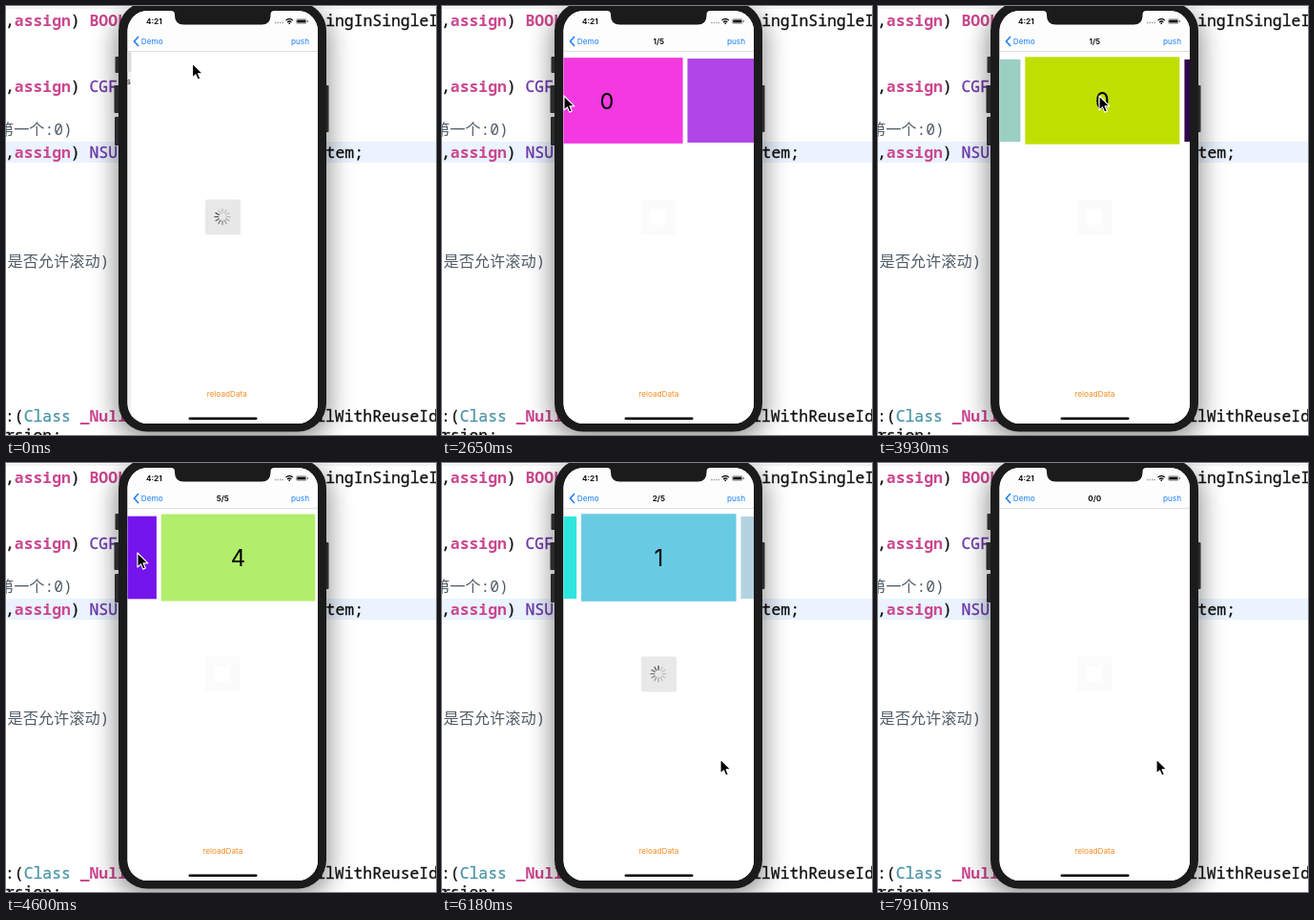
Animation, 451 px wide and 449 px high, one loop 8000 ms. Source, as an HTML page:

```html
<!DOCTYPE html>
<html lang="en">
<head>
<meta charset="utf-8">
<title>Paging carousel demo</title>
<style>
  html, body { margin: 0; width: 100%; height: 100%; overflow: hidden; background: #fff; }
  svg { display: block; width: 451px; height: 449px; }
  text { white-space: pre; }
  .code { font: 500 16.4px "Noto Sans Mono", "DejaVu Sans Mono", monospace; fill: #111; stroke: #111; stroke-width: .3px; }
  .key { font-weight: 600; fill: #cb478f; stroke: none; }
  .type { fill: #6c36a9; stroke: #6c36a9; }
  .class { fill: #4b95a6; stroke: #4b95a6; }
  .note { font: 16.2px "Noto Sans Mono", "Noto Sans CJK SC", "Noto Sans CJK", monospace; fill: #525d68; }
  .ui { font: 8.2px Inter, Roboto, sans-serif; }
  .ui.bold { font-weight: 600; }
  .blue { fill: #147efb; }
  .mid { text-anchor: middle; }
  .digit { font: 24px Inter, Roboto, sans-serif; text-anchor: middle; }
</style>
</head>
<body>
<svg viewBox="0 0 451 449">
  <defs>
    <filter id="blur" x="-40%" y="-20%" width="180%" height="140%">
      <feGaussianBlur stdDeviation="13"/>
    </filter>
    <clipPath id="screen"><rect x="127.5" y="5" width="199.5" height="432" rx="21"/></clipPath>
  </defs>

  <rect width="451" height="449" fill="#fff"/>
  <rect y="1.5" width="451" height="1" fill="#e6e6e6"/>
  <rect y="142" width="451" height="22" fill="#eaf3fe"/>
  <g class="code">
    <text x="-1" y="21">,<tspan class="key">assign</tspan>) <tspan class="key">BOOL</tspan></text>
    <text x="335.2" y="21">ingInSingleItem</text>
    <text x="-1" y="90">,<tspan class="key">assign</tspan>) <tspan class="type">CGFloat</tspan></text>
    <text x="-1" y="159">,<tspan class="key">assign</tspan>) <tspan class="type">NSUInteger</tspan></text>
    <text x="335.6" y="159">tem;</text>
    <text x="-1" y="435">:(<tspan class="class">Class</tspan> <tspan class="key">_Nullable</tspan>)</text>
    <text x="325.2" y="435">llWithReuseId</text>
    <text x="-1" y="455">rsion;</text>
  </g>
  <g class="note">
    <text x="-8" y="135">第一个:0)</text>
    <text x="1.5" y="273">是否允许滚动)</text>
  </g>

  <rect x="115" y="4" width="224" height="450" rx="32" opacity=".44" filter="url(#blur)"/>
  <g fill="#2b2b2d">
    <rect x="114.5" y="53" width="6" height="17" rx="1"/>
    <rect x="113.5" y="83" width="6" height="29" rx="1"/>
    <rect x="114" y="116" width="6" height="30" rx="1"/>
    <rect x="333" y="83" width="5.5" height="49" rx="1"/>
  </g>
  <rect x="118" y="-4" width="218" height="449.6" rx="30" fill="#1b1b1c"/>

  <g clip-path="url(#screen)">
    <rect x="127" y="5" width="200" height="432" fill="#fff"/>
    <g id="behind">
      <rect x="127" y="48" width="8" height="389" fill="#f1f1f1"/>
      <rect x="127" y="48" width="8" height="21" fill="#dcdcdc"/>
      <text class="ui" x="126.5" y="82">s</text>
    </g>
    <g id="page">
      <rect x="127" y="48" width="205" height="389" fill="#fff"/>
      <g id="cards"></g>
      <text class="ui mid" x="227.3" y="409.3" fill="#f58a1f">reloadData</text>
    </g>
    <rect x="127" y="5" width="200" height="42.5" fill="#fdfdfd"/>
    <rect x="127" y="47" width="200" height=".8" fill="#d9d9db"/>
    <path d="M139 32l-4.600 5 4.600 5" fill="none" stroke="#147efb" stroke-width="1.5"/>
    <text class="ui blue" x="141.800" y="39.800">Demo</text>
    <text class="ui blue" x="299" y="39.800">push</text>
    <text class="ui mid bold" id="title" x="227.300" y="39.800"></text>

    <text class="ui bold" x="147" y="18.800">4:21</text>
    <path d="M282 17.500h9" stroke="#a5a5a5" stroke-width="1.300" stroke-dasharray="1.500 1"/>
    <g fill="none" stroke="#111">
      <path d="M293.500 15q3.700-3 7.400 0M295 16.900q2.200-1.800 4.400 0" stroke-width="1.300"/>
      <path d="M296.400 18.300h1.600" stroke-width="1.400"/>
      <rect x="304.400" y="13.600" width="10.800" height="4.800" rx="1.300" stroke-width=".6" stroke="#777"/>
    </g>
    <rect x="305.200" y="14.400" width="9.200" height="3.200" rx=".7" fill="#111"/>
    <rect x="315.900" y="15" width="1" height="2" fill="#777"/>

    <rect x="191.500" y="430.500" width="72" height="2.600" rx="1.300"/>
    <g id="hud">
      <rect x="209" y="202.500" width="37" height="37" rx="2" fill="#e8e8e8"/>
      <g id="spinner" stroke="#4c4c4c" stroke-width="1.300" stroke-linecap="round"></g>
      <rect id="hole" x="218" y="213" width="16" height="16" fill="#fff"/>
    </g>
  </g>
  <path d="M173 4v1q4 0 4 4v1q0 9.500 9.500 9.500h81.500q9.500 0 9.500-9.500v-1q0-4 4-4v-1z" fill="#1b1b1c"/>

  <path id="cursor" d="M0 0v14.300l3.300-3 2.200 5 2.500-1.100-2.200-4.900h4.600z" stroke="#fff" stroke-width="1.100" stroke-linejoin="round"/>
</svg>

<script>
const LOOP = 8000, PITCH = 162.5, CENTER = 227.3;
const LOADED = 1570, EMPTY = 7770;
const SETTLE = 440, REACH = 120;
const NS = "http://www.w3.org/2000/svg";
const $ = id => document.getElementById(id);

const clamp = v => Math.min(Math.max(v, 0), 1);
const ramp = (t, from, to) => clamp((t - from) / (to - from));
const smooth = p => p * p * (3 - 2 * p);
const easeOut = p => 1 - (1 - p) ** 2;
const sum = (list, fn) => list.reduce((total, item) => total + fn(item), 0);

function add(parent, tag, attrs) {
  const node = document.createElementNS(NS, tag);
  for (const key in attrs) node.setAttribute(key, attrs[key]);
  return parent.appendChild(node);
}

function show(node, visible) {
  node.style.display = visible ? "" : "none";
}

// Each swipe flicks the cursor left, and the list glides on by some pages.
const swipes = [
  { at: 2570, pages: 1 }, { at: 3110, pages: 2 }, { at: 3560, pages: 2 },
  { at: 3950, pages: 3 }, { at: 4300, pages: 1 }, { at: 4800, pages: 2 }
];
const scrollAt = t => sum(swipes, s => s.pages * easeOut(ramp(t, s.at, s.at + SETTLE)));
const flickAt = t => REACH * sum(swipes, ({ at }) =>
  smooth(ramp(t, at, at + 105)) - smooth(ramp(t, at + 286, at + 336)));

// The cursor's stops outside the swipes.
const start = { x: 195.5, y: 60 };
const moves = [
  { from: 2080, to: 2290, x: 252, y: 158 },
  { from: 2290, to: 2420, x: 232, y: 94 },
  { from: 5130, to: 5420, x: 214, y: 436 },
  { from: 5420, to: 5560, x: 228, y: 404 },
  { from: 5690, to: 5890, x: 292, y: 310 }
];
function cursorAt(t) {
  let { x, y } = start;
  for (const move of moves) {
    const p = smooth(ramp(t, move.from, move.to));
    x += (move.x - x) * p;
    y += (move.y - y) * p;
  }
  return [x - flickAt(t), y];
}

const colors = [
  "#61b98d", "#f23ae0", "#b046e7", "#748d5c", "#4f30ff", "#9acfc1", "#bfdf00",
  "#2f0849", "#df9147", "#7415ec", "#b1ee6b", "#2fe6df", "#69cae4", "#b4d3e1"
];
const cards = colors.map((fill, n) => {
  const node = add($("cards"), "g", {});
  add(node, "rect", { x: -PITCH / 2, y: -45.8, width: PITCH, height: 91.6, fill });
  add(node, "text", { class: "digit", y: 9 }).textContent = (n + 4) % 5;
  return { node, index: n - 1 };
});
const spokes = Array.from({ length: 12 }, (_, n) => add($("spinner"), "path", {
  d: "M0-4.3v-3.8", transform: `translate(227 220.7) rotate(${n * 30})`
}));

function drawCards(t) {
  const scroll = scrollAt(t);
  const loaded = t >= LOADED && t < EMPTY;
  show($("cards"), loaded);
  for (const { node, index } of cards) {
    const offset = index - scroll;
    const scale = 1 - .06 * Math.min(Math.abs(offset), 1);
    show(node, Math.abs(offset) < 1.7);
    node.setAttribute("transform", `translate(${CENTER + offset * PITCH} 99) scale(${scale})`);
  }
  const page = Math.round(scroll) % 5 + 1;
  $("title").textContent = t < 130 ? "" : loaded ? page + "/5" : "0/0";
}

function drawHud(t) {
  const shown = 1 - ramp(t, 1500, 1680) + ramp(t, 5600, 5650) - ramp(t, 7690, 7880);
  const head = Math.floor(t * 12 / 1000) + 10;
  $("hud").setAttribute("opacity", .15 + .85 * shown);
  show($("spinner"), shown > .05);
  show($("hole"), shown <= .05);
  spokes.forEach((spoke, n) => {
    const age = (head - n + 12) % 12;
    spoke.setAttribute("stroke-opacity", Math.max(.25, 1 - age * .1));
  });
}

function draw(t) {
  const shift = 4.5 * (1 - easeOut(ramp(t, 0, 180)));
  $("page").setAttribute("transform", `translate(${shift} 0)`);
  show($("behind"), shift > 0);
  drawCards(t);
  drawHud(t);
  $("cursor").setAttribute("transform", `translate(${cursorAt(t)}) scale(1.05)`);
}

const began = performance.now();
function tick() {
  draw((performance.now() - began) % LOOP);
  requestAnimationFrame(tick);
}
tick();
</script>
</body>
</html>
```
